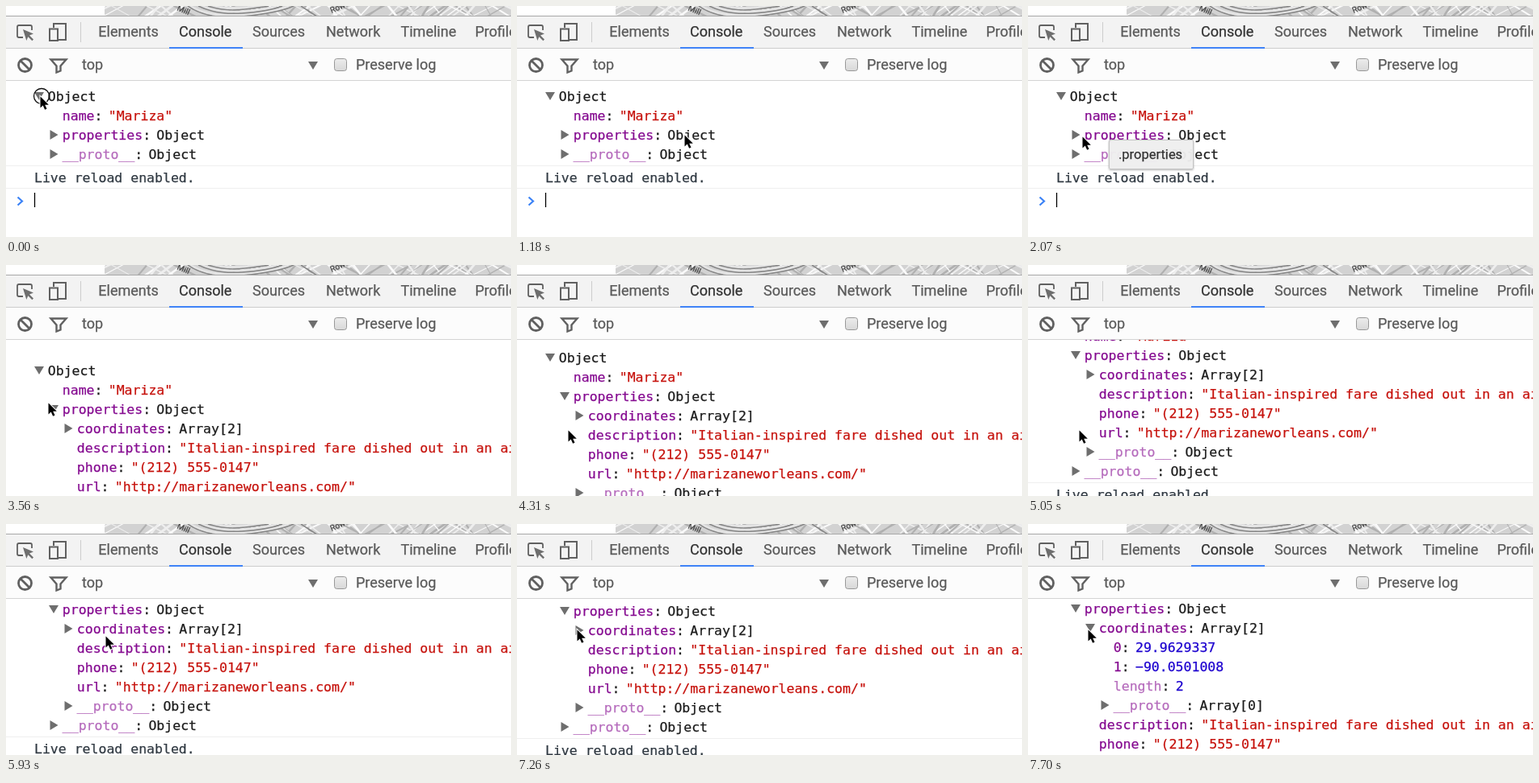
Recreate the animation shown at these times as an HTML page. Size 625 by 287 pixels, loop 8000 ms.

```html
<!DOCTYPE html>
<html lang="en">
<head>
<meta charset="utf-8">
<title>Console object inspector</title>
<style>
html, body { margin: 0; width: 100%; height: 100%; overflow: hidden; background: #fff; }
svg { display: block; width: 625px; height: 287px; }
text { white-space: pre; fill: currentColor; stroke: currentColor; stroke-width: .25px; }
.ui { font: 18px Roboto, Arial, sans-serif; color: #5a5a5a; }
.mono { font: 16.5px "DejaVu Sans Mono", Menlo, monospace; color: #1c1c1c; }
.key { color: #850a90; }
.dim { color: #850a90; opacity: .6; }
.str { color: #c6120c; }
.num { color: #1c00cf; }
.icon { fill: none; stroke: #606060; }
.solid { fill: #6e6e6e; }
</style>
</head>
<body>
<svg viewBox="0 0 625 287">
  <defs>
    <clipPath id="mapClip"><path d="M122 0H625V12H122z"/></clipPath>
    <clipPath id="bodyClip"><path d="M0 93H625V287H0z"/></clipPath>
    <linearGradient id="box" x2="0" y2="1"><stop stop-color="#ececec"/><stop offset="1" stop-color="#d8d8d8"/></linearGradient>
    <filter id="shade" x="-10%" y="-20%" width="120%" height="150%"><feDropShadow dx="0" dy="1" stdDeviation="1.2" flood-opacity=".3"/></filter>
  </defs>

  <g clip-path="url(#mapClip)">
    <path fill="#d2d2d2" d="M122 0H625V12H122z"/>
    <g id="streets" fill="none"></g>
    <g fill="none" stroke="#858585">
      <path d="M228 0Q250 14 290 11T350 0M242 0Q262 9 292 7T335 0M256 0Q275 5 318 0" stroke="#e4e4e4" stroke-width="3"/>
      <path d="M225 0Q248 17 292 13T356 0M238 0Q260 11 292 9T342 0M250 0Q270 7 296 4T325 0M365 0L385 13" stroke-width="1.5"/>
    </g>
    <g font-family="Roboto, sans-serif" font-size="10" color="#444">
      <text transform="translate(211 5) rotate(24)">Mill</text>
      <text transform="translate(403 9) rotate(-24)">Row</text>
    </g>
  </g>

  <path fill="#f3f3f3" d="M0 13H625V52H0z"/>
  <path fill="#fcfcfc" d="M0 53H625V92H0z"/>
  <path d="M0 12.5H625" stroke="#a8a8a8"/>
  <path d="M0 52.5H625" stroke="#ccc"/>
  <path d="M0 92.5H625" stroke="#d4d4d4"/>
  <path d="M92.5 20V45" stroke="#ccc"/>
  <path fill="#3e82f7" d="M202 51H293V53H202z"/>

  <path class="icon" stroke-width="1.8" d="M21 39H16Q14 39 14 37V26Q14 24 16 24H30Q32 24 32 26V30"/>
  <path class="solid" d="M21 29L34 34.5L29 36.5L34 41.5L32.3 43.2L27.3 38.2L25.3 43z"/>
  <path class="icon" stroke-width="2" d="M59 27V22H74V42H65M54 28.5H64V43H54z"/>
  <circle class="icon" stroke-width="2.8" cx="23.5" cy="73.5" r="8"/>
  <path class="icon" stroke-width="2.8" d="M17.7 67.7L29.3 79.3"/>
  <path class="icon" stroke-width="2.4" d="M55.5 66.5H74.5L67.5 74.500V80.500L62.500 82.500V74.500z"/>

  <g class="ui" id="tabs">
    <text x="94" y="79">top</text>
    <text x="433" y="79">Preserve log</text>
  </g>
  <path class="solid" d="M374 69H386L380 79z"/>
  <rect x="406.500" y="65.500" width="15" height="15" rx="3" fill="url(#box)" stroke="#989898"/>

  <g clip-path="url(#bodyClip)">
    <g id="tree" class="mono"></g>
    <g id="foot" class="mono">
      <path d="M0 14.500H625M0 42.500H625" stroke="#efefef"/>
      <text x="35" y="35" color="#303942">Live reload enabled.</text>
      <path d="M14.500 53.500L20 58.500L14.500 63.500" fill="none" stroke="#3b82f6" stroke-width="2.200"/>
      <path id="caret" d="M35.500 48V66" stroke="#000" stroke-width="1.300"/>
    </g>
  </g>

  <g id="tip">
    <rect x="100.500" y="166.500" width="104" height="36" rx="1.500" fill="#f1f1f1" fill-opacity=".94" stroke="#c4c4c4" filter="url(#shade)"/>
    <text x="112" y="190" font-family="Roboto, Arial, sans-serif" font-size="16.500" color="#333">.properties</text>
  </g>

  <g id="pointer">
    <circle id="ring" cx="1" cy="-1" r="9.500" fill="none" stroke="#111" stroke-width="1.300"/>
    <path transform="translate(-.5 -.5)" d="M0 0V14L3.200 11L5.600 16.300L8 15.200L5.700 10.200H10.300z" stroke="#fff" stroke-width="2" paint-order="stroke"/>
  </g>
</svg>

<script>
const LOOP = 8000, TICK = 148, LINE = 24, CHAR = 9.933;
const $ = id => document.getElementById(id);

const tabs = { Elements: 114.3, Console: 214, Sources: 305, Network: 396, Timeline: 488.5, Profiles: 580.5 };
for (const [name, x] of Object.entries(tabs))
  $("tabs").innerHTML += `<text x="${x}" y="38"${name === "Console" ? ' color="#333"' : ""}>${name}</text>`;

// Streets on the strip of map
let seed = 11;
const rnd = () => (seed = seed * 16807 % 2147483647) / 2147483647;
let streets = "";
for (let i = 0; i < 75; i++) {
  const x = 122 + rnd() * 503, slant = (rnd() < .5 ? -1 : 1) * (8 + rnd() * 22);
  const tone = ["#fafafa", "#eeeeee", "#b0b0b0"][i % 3];
  streets += `<path d="M${x} -1l${slant} 14" stroke="${tone}" stroke-width="${1 + rnd() * 2}"/>`;
}
$("streets").innerHTML = streets;

// Rows: level, arrow (0 none, 1 closed, 2 open), key, value, value class, dim key
function rows(props, coords) {
  const list = [[0, 2, "", "Object"], [1, 0, "name", '"Mariza"', "str"], [1, 1 + props, "properties", "Object"]];
  if (props) {
    list.push([2, 1 + coords, "coordinates", "Array[2]"]);
    if (coords) list.push(
      [3, 0, "0", "29.9629337", "num"], [3, 0, "1", "\u221290.0501008", "num"],
      [3, 0, "length", "2", "num", 1], [3, 1, "__proto__", "Array[0]", "", 1]);
    list.push(
      [2, 0, "description", '"Italian-inspired fare dished out in an airy space"', "str"],
      [2, 0, "phone", '"(212) 555-0147"', "str"],
      [2, 0, "url", '"http://marizaneworleans.com/"', "str"],
      [2, 1, "__proto__", "Object", "", 1]);
  }
  list.push([1, 1, "__proto__", "Object", "", 1]);
  return list;
}

function rowMarkup([level, arrow, key, value, kind = "", dim], i) {
  const x = 51.8 + 18 * level, y = i * LINE, end = x + key.length * CHAR;
  const text = (tx, s, cls) => `<text x="${tx}" y="${y + 6}" class="${cls}">${s}</text>`;
  const shape = ["", "M-4.500 -6L5.500 0L-4.500 6z", "M-6 -5H6L0 5z"][arrow];
  return (arrow ? `<path class="solid" transform="translate(${41 + 18 * level} ${y})" d="${shape}"/>` : "") +
    (key ? text(x, key, dim ? "dim" : "key") + text(end, ":", "") + text(end + CHAR + 7.3, value, kind)
         : text(x, value, kind));
}

// Keys: tick, then values
const pointer = [[0, 43, 113], [2, 46, 117], [5, 90, 154], [8, 208, 161], [10, 142, 158], [12, 96, 157],
  [13, 76, 161], [14, 68, 163], [16, 58, 160], [18, 57, 160], [21, 52, 164], [23, 52, 164],
  [24, 53, 172], [27, 64, 206], [36, 64, 206], [40, 124, 140], [44, 120, 200], [49, 75, 132]];
const scroll = [[0, 112], [18, 112], [21, 131], [28, 131], [31, 82], [35, 58], [41, 58], [43, 60], [51, 60], [52, 57]];

function at(keys, n) {
  const i = keys.findIndex(k => k[0] > n);
  if (i < 0) return keys[keys.length - 1].slice(1);
  const a = keys[i - 1], b = keys[i], u = (n - a[0]) / (b[0] - a[0]);
  return a.slice(1).map((v, j) => v + (b[j + 1] - v) * u);
}

const show = (id, on) => $(id).style.display = on ? "" : "none";
let state = "", count = 0;

function draw(t) {
  const n = Math.floor(t / TICK + .04);
  const props = +(n >= 17), coords = +(n >= 51);
  if (state !== `${props}${coords}`) {
    state = `${props}${coords}`;
    const list = rows(props, coords);
    count = list.length;
    $("tree").innerHTML = list.map(rowMarkup).join("");
  }
  const top = Math.round(at(scroll, n)[0]);
  $("tree").setAttribute("transform", `translate(0 ${top})`);
  $("foot").setAttribute("transform", `translate(0 ${top + (count - 1) * LINE})`);
  $("pointer").setAttribute("transform", `translate(${at(pointer, n).map(Math.round)})`);
  show("ring", n === 0 || n === 17 || n === 51);
  show("tip", n >= 13 && n < 16);
  show("caret", Math.floor(t / 500) % 2 === 0);
}

const start = performance.now();
(function frame() {
  draw((performance.now() - start) % LOOP);
  requestAnimationFrame(frame);
})();
</script>
</body>
</html>
```
